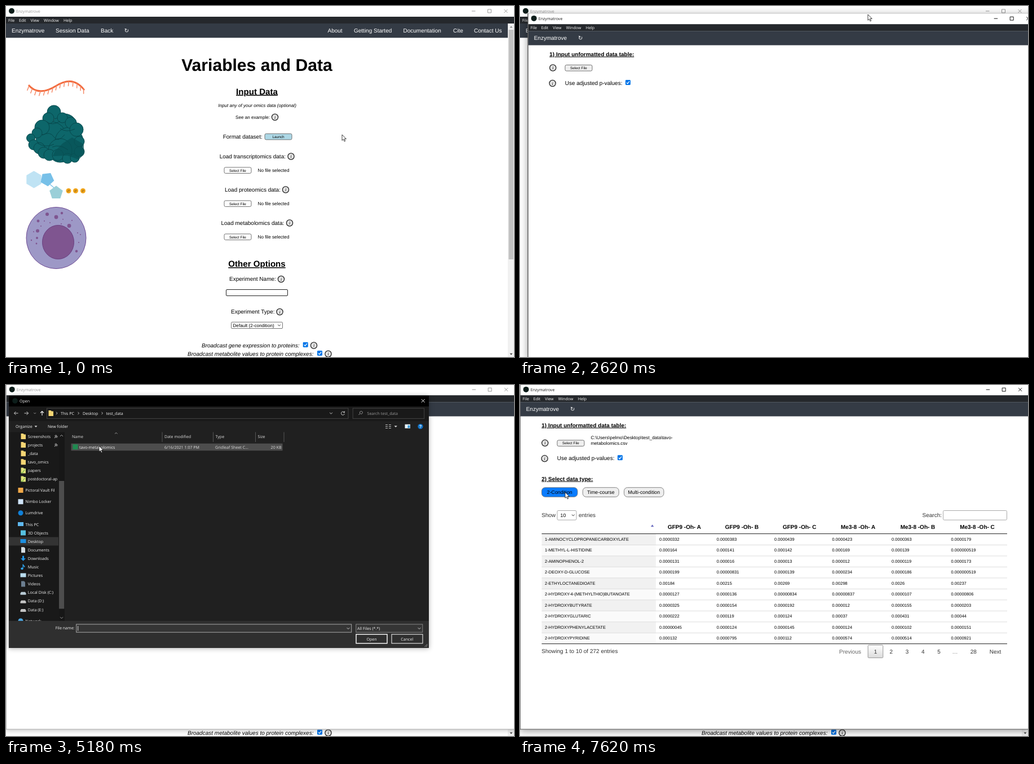
Write an HTML page that moves like this. It is 901 px wide and 622 px high and loops after 8000 ms.

```html
<!DOCTYPE html>
<html lang="en">
<head>
<meta charset="utf-8">
<title>Data formatting walkthrough</title>
<style>
html, body { margin: 0; width: 100%; height: 100%; overflow: hidden; background: #fff; }
svg { display: block; width: 100vw; height: 100vh; font: 10px "Liberation Sans", Arial, sans-serif; text-rendering: geometricPrecision; }
text { white-space: pre; }
.ui { font: 7.1px "Open Sans", "Noto Sans", sans-serif; }
.b { font-weight: bold; }
.u { text-decoration: underline; }
.i { font-style: italic; }
.m { text-anchor: middle; }
.e { text-anchor: end; }
.sym { font-family: "DejaVu Sans", sans-serif; }
.info { font: italic 8px "Liberation Serif", serif; text-anchor: middle; }
.line { fill: none; stroke: currentColor; }
#childShade { filter: drop-shadow(0 3px 7px rgba(0,0,0,.38)); }
#childShade.off { filter: drop-shadow(0 2px 4px rgba(0,0,0,.22)); }
#dialogShade { filter: drop-shadow(0 1px 4px rgba(0,0,0,.3)); }
</style>
</head>
<body>
<svg id="stage" viewBox="0 0 901 622" preserveAspectRatio="none"></svg>
<script>
const APP = 'Enzymatrove', FILE = 'tavo-metabolomics';

const T = (x, y, s, cls = '', o = '') => `<text x="${x}" y="${y}" class="${cls}" ${o}>${s}</text>`;
const S = (n, fill = '') => `style="font-size:${n}px${fill && ';fill:' + fill}"`;
const R = (x, y, w, h, fill, o = '') => `<rect x="${x}" y="${y}" width="${w}" height="${h}" fill="${fill}" ${o}/>`;
const C = (x, y, r, fill, o = '') => `<circle cx="${x}" cy="${y}" r="${r}" fill="${fill}" ${o}/>`;
const P = (d, fill, o = '') => `<path d="${d}" fill="${fill}" ${o}/>`;
const L = (d, color, w = 1) => P(d, 'none', `stroke="${color}" stroke-width="${w}"`);
const G = (id, body, o = '') => `<g id="${id}" ${o}>${body}</g>`;
const chevron = (x, y, s, color = '#ddd') => L(`M${x - s} ${y - s / 2}l${s} ${s} ${s} ${-s}`, color, .9);
const info = (x, y) => C(x, y, 5.6, '#e2e2e2', 'stroke="#222" stroke-width="1.3"') + T(x, y + 2.6, 'i', 'info');
const check = (x, y) => R(x, y, 9, 9, '#0075e8', 'rx="1.4"') + L(`M${x + 2} ${y + 4.7}l1.8 1.9 3.4-4.2`, '#fff', 1.3);
const button = (x, y, s, fill) =>
  R(x, y, 48, 10.6, fill, 'rx="2.4" stroke="#666" stroke-width=".9"') + T(x + 24, y + 7.6, s, 'm', S(6.4));
const poly = (x, y, r, n, turn, fill) =>
  `<polygon fill="${fill}" points="${Array.from({ length: n }, (_, k) => {
    const a = turn + k * 2 * Math.PI / n;
    return (x + r * Math.cos(a)).toFixed(1) + ',' + (y + r * Math.sin(a)).toFixed(1);
  }).join(' ')}"/>`;

// Title bar, menu and navigation shared by both app windows
const head = (id, reloadX) =>
  R(0, 0, 902, 19, '#fff') +
  C(10, 8.7, 5, '#0c1d1a') +
  G(id, T(18, 12, APP, 'ui', 'fill="currentColor"') +
    '<path class="line" d="M826 9h6.5M854.5 6h6v6h-6zM883.5 6l6 6m0-6l-6 6"/>') +
  R(0, 19, 902, 12, '#25282c') +
  [['File', 4], ['Edit', 23], ['View', 43.5], ['Window', 67], ['Help', 102]]
    .map(([s, x]) => T(x, 27.6, s, 'ui', 'fill="#fff"')).join('') +
  R(0, 31, 902, 25.3, '#343b45') +
  T(10, 46.7, APP, '', 'fill="#fff"') +
  T(reloadX, 46.8, '↻', 'sym m', 'fill="#fff"');

function art() {
  const protein = [[104, 213, 22], [80, 232, 27], [112, 240, 25], [96, 256, 21], [85, 188, 12], [75, 199, 10],
    [100, 198, 9], [115, 207, 10], [125, 219, 12], [64, 215, 13], [55, 225, 9], [44, 234, 7.5], [49, 246, 9],
    [59, 252, 10], [67, 260, 10], [77, 264, 10], [92, 264, 10], [109, 270, 9], [122, 269, 8], [130, 258, 9], [130, 240, 9]];
  const spots = [[73, 369, 3], [89, 374, 3.4], [99, 367, 2.2], [57, 381, 2.4], [56, 398.5, 3], [55, 411, 2],
    [112, 389.5, 3.4], [125, 434.5, 2.2], [45, 415, 1.2], [129, 419, 1], [117, 380, 1], [68, 381, 1],
    [62, 390, 1], [78, 384, 1], [98, 386, 1], [49, 400, 1], [127, 402, 1], [132, 405, 1], [101, 378, .9], [54, 421, 1.4]];
  return P('M40 140C53 156 72 152 88 142S122 127 139 149', 'none', 'id="strand" stroke="#f26a3c" stroke-width="2.8"') +
    G('teeth', '') +
    protein.map(([x, y, r]) => C(x, y, r, '#0d666a', 'stroke="#07494d" stroke-width="1"')).join('') +
    P('M101 243l16-10 21 12v18l-9 9-20-7-26 1 4-9z', '#075256', 'opacity=".75"') +
    L('M72 205q10 8 24-1M64 229q14-8 21 3t19-4M56 243q14 9 29 2M82 250q13-6 28 5M96 217q11 8 26 1', '#07494d', 1) +
    L('M62 307h8M78 316l7 6', '#77c0e8', 1.2) +
    poly(49.5, 307.5, 15.2, 6, Math.PI / 6, '#bfe3f4') +
    poly(73, 307, 12.5, 5, .2, '#77c0e8') +
    poly(89, 331, 12.4, 5, -Math.PI / 2, '#9acfd8') +
    [111, 123.5, 136.5].map(x => C(x, 327.5, 4.5, '#f2a61c') + T(x, 329.7, 'P', 'm i', S(6, '#76500a'))).join('') +
    '<ellipse cx="89" cy="411" rx="53" ry="54.5" fill="#9d98c6" stroke="#6f4b94"/>' +
    '<ellipse cx="92.5" cy="418.5" rx="28" ry="30" fill="#7f5590" stroke="#6a3f80"/>' +
    spots.map(([x, y, r]) => C(x, y, r, '#7f5590')).join('');
}

function mainPage() {
  const loader = (y, s, x, ix) =>
    T(x, y + 3.6, s) + info(ix, y + .3) + button(387, y + 19.7, 'Select File', '#fcfcfc') + T(446.5, y + 27.4, 'No file selected', '', S(8.2));
  return R(0, 0, 901, 622, '#fff') + head('mainTitle', 214) +
    [['Session Data', 88], ['Back', 168], ['About', 570.5], ['Getting Started', 617], ['Documentation', 704.5], ['Cite', 793], ['Contact Us', 830]]
      .map(([s, x]) => T(x, 46.7, s, '', 'fill="#fff"')).join('') +
    R(890, 31, 11, 591, '#f1f1f1') + R(891.5, 42, 8.5, 407, '#c1c1c1') +
    P('M893.5 38.5h5l-2.5-3z', '#888') + P('M893.5 615.5h5l-2.5 3z', '#444') +
    art() +
    T(445, 114.5, 'Variables and Data', 'b m', S(30.1)) +
    T(445, 156.5, 'Input Data', 'b u m', S(15.1)) +
    T(445.5, 179, 'Input any of your omics data (optional)', 'i m', S(8.17)) +
    T(407, 200, 'See an example:', '', S(8.15)) + info(477, 197) +
    T(384.7, 235, 'Format dataset:') + button(459, 226.3, 'Launch', '#add8e6') +
    loader(266.2, 'Load transcriptomics data:', 378.7, 505.5) +
    loader(325.2, 'Load proteomics data:', 388, 496) +
    loader(384.2, 'Load metabolomics data:', 381.5, 503) +
    T(445, 462, 'Other Options', 'b u m', S(15.1)) +
    T(396, 487, 'Experiment Name:') + info(488, 484) +
    R(390.5, 502.5, 109, 11, '#fff', 'rx="1.5" stroke="#222"') +
    T(399, 545, 'Experiment Type:') + info(485.5, 542) +
    R(399.5, 560.2, 91, 11.3, '#fff', 'rx="1.5" stroke="#767676"') +
    T(402.5, 568.8, 'Default (2-condition)', '', S(8.15)) + chevron(484.5, 565.8, 2.3, '#111') +
    T(347, 604.5, 'Broadcast gene expression to proteins:', 'i') + check(526.7, 595.7) + info(546, 601.5) +
    T(322, 619.5, 'Broadcast metabolite values to protein complexes:', 'i') + check(552, 610.7) + info(571.5, 616.5);
}

const rows = `1-AMINOCYCLOPROPANECARBOXYLATE 0.0000332 0.0000383 0.0000439 0.0000423 0.0000363 0.0000179
1-METHYL-L-HISTIDINE 0.000164 0.000141 0.000142 0.000169 0.000139 0.000000519
2-AMINOPHENOL-2 0.0000131 0.000016 0.000013 0.000012 0.0000119 0.0000173
2-DEOXY-D-GLUCOSE 0.0000199 0.00000831 0.0000139 0.0000234 0.0000186 0.000000519
2-ETHYLOCTANEDIOATE 0.00184 0.00215 0.00269 0.00298 0.0026 0.00237
2-HYDROXY-4-(METHYLTHIO)BUTANOATE 0.0000127 0.0000136 0.00000834 0.00000837 0.0000107 0.00000806
2-HYDROXYBUTYRATE 0.0000325 0.0000154 0.0000192 0.000012 0.0000155 0.0000203
2-HYDROXYGLUTARIC 0.0000222 0.000119 0.000124 0.00037 0.000431 0.00044
2-HYDROXYPHENYLACETATE 0.00000045 0.0000124 0.0000145 0.0000124 0.0000102 0.0000151
2-HYDROXYPYRIDINE 0.000132 0.0000795 0.000112 0.0000574 0.0000514 0.0000921`.split('\n').map(r => r.split(' '));

function table() {
  const cols = [44, 247, 348.7, 451, 553.5, 659, 764.5];
  const heads = [['GFP9 -Oh- A', 291.5], ['GFP9 -Oh- B', 393.5], ['GFP9 -Oh- C', 495.7], ['Me3-8 -Oh- A', 599.7], ['Me3-8 -Oh- B', 705.5], ['Me3-8 -Oh- C', 811]];
  const pages = [['Previous', 585.5], ['1', 630.5], ['2', 658.3], ['3', 686.5], ['4', 714.7], ['5', 743], ['…', 771.5], ['28', 804.3], ['Next', 843]];
  return T(38.3, 233.7, 'Show', '', 'fill="#333"') + R(66, 222.5, 34, 16.7, '#fff', 'rx="2" stroke="#aaa"') +
    T(71.5, 234, '10', '', S(8.8)) + chevron(94.3, 230.7, 2.4, '#111') + T(104, 233.7, 'entries', '', 'fill="#333"') +
    T(748, 233.7, 'Search:', 'e', 'fill="#333"') + R(750.5, 222.5, 113, 16.7, '#fff', 'rx="2" stroke="#aaa"') +
    P('M232 251.3h5.4l-2.7-4z', '#6a6cc0') +
    heads.map(([s, x]) => T(x, 254.6, s, 'b m')).join('') +
    rows.map((r, k) => {
      const y = 264 + k * 19.48;
      return R(38.5, y, 202.5, 19.5, k % 2 ? '#fafafa' : '#f1f1f1') + (k ? L(`M38.5 ${y}H864`, '#ddd') : '') +
        r.map((s, c) => T(cols[c], y + 11.8, s, '', S(7.55))).join('');
    }).join('') +
    L('M38.5 263.6H864M38.5 458.6H864', '#222') +
    T(38.3, 475, 'Showing 1 to 10 of 272 entries', '', 'fill="#333"') +
    R(617.2, 461, 26.6, 22.4, 'url(#page)', 'rx="1.2" stroke="#979797"') +
    pages.map(([s, x], k) => T(x, 475.5, s, 'm', `fill="${k % 6 ? '#333' : '#666'}"`)).join('');
}

function child() {
  const pill = (x, w, s, id) =>
    R(x, 181.7, w, 16.6, '#efefef', `id="${id}" rx="6" stroke="#777" stroke-width=".9"`) + T(x + w / 2, 193, s, 'm', S(8.8));
  return R(0, -.6, 902, 610.6, '#fff', 'id="childShade" stroke="currentColor"') +
    `<g transform="translate(.7 -.8)">${head('childTitle', 92.5)}</g>` +
    L('M.3-.6V610', 'currentColor', .8) +
    T(38.3, 74.7, '1) Input unformatted data table:', 'b u') +
    G('form', info(44.3, 95.5) + button(66, 90.5, 'Select File', '#efefef') + info(43.7, 123) +
      T(65.7, 125.7, 'Use adjusted p-values:') + check(173, 117)) +
    G('loaded', T(125.5, 96.2, 'C:\\Users\\pelmo\\Desktop\\test_data\\tavo-', '', S(8.2)) + T(125.5, 105.6, 'metabolomics.csv', '', S(8.2)) +
      T(38.3, 169.7, '2) Select data type:', 'b u') +
      pill(38.5, 63.5, '2-Condition', 'twoCond') + pill(111.3, 64, 'Time-course', 'timeCourse') + pill(184.6, 70.4, 'Multi-condition', 'multiCond')) +
    G('table', table());
}

const icons = {
  folder: 'M-4-5h4l1.5 1.5H4.5V5H-4z',
  tile: 'M-4.5-4.5h9v9h-9z',
  disc: 'M-4.5 0a4.5 4.5 0 1 0 9 0a4.5 4.5 0 1 0-9 0',
  screen: 'M-5-4H5V3H-5z',
  page: 'M-3.5-5h5l2 2V5h-7z',
  down: 'M-1.5-4.5h3V0h3L0 4.5-4.5 0h3z',
  note: 'M-1-5h1.2q.3 2 2.8 3.5q0 2-1 2.5q0-2-1.8-2.5V3a2.2 1.8 0 1 1-1.2-1.6z',
  drive: 'M-3.5-1h7l1.5 2.5V4H-5V1.5z'
};
const places = [['Screenshots', 'folder', '#f7d674'], ['projects', 'folder', '#f7d674'], ['_data', 'folder', '#f7d674'],
  ['tavo_omics', 'folder', '#f7d674'], ['papers', 'folder', '#dfe27a'], ['postdoctoral-ap', 'folder', '#dfe27a'],
  ['Pictoral Vault Fil', 'tile', '#f0a848', 1], ['Nimbo Locker', 'tile', '#cfe4f8', 1], ['Lumdrive', 'disc', '#1080d8', 1],
  ['This PC', 'screen', '#5fb8ee', 1], ['3D Objects', 'tile', '#56c0e0'], ['Desktop', 'screen', '#1e90e0'],
  ['Documents', 'page', '#d5dde2'], ['Downloads', 'down', '#2196e8'], ['Music', 'note', '#2fa4ee'], ['Pictures', 'screen', '#b9dcee'],
  ['Videos', 'page', '#6c7e90'], ['Local Disk (C:)', 'drive', '#b8cad4'], ['Data (D:)', 'drive', '#c4c4c4'],
  ['Data (E:)', 'drive', '#c4c4c4'], ['Network', 'disc', '#4ba3dc', 1]];

function dialog() {
  const W = 'fill="#f2f2f2"', ui = (x, y, s, o = W, c = '') => T(x, y, s, 'ui ' + c, o);
  const icon = (x, y, kind, color) => P(icons[kind], color, `transform="translate(${x} ${y})"`);
  let y = 75.9;
  const list = places.map(([s, kind, color, gap]) => {
    y += gap ? 20.1 : 15.1;
    const x = gap ? 26 : 30.5;
    return icon(x, y, kind, color) + (color === '#dfe27a' ? L(`M${x - 4} ${y + 3}l2 2 5-7`, '#4aa53a') : '') + ui(x + 8.3, y + 2.6, s);
  }).join('');
  const pin = y => L(`M86 ${y + 3}l2.5-2.5m-2-2l4 4m-2.5-5l3.5 3.5`, '#999', 1.1);
  const box = (x, y, w, h, fill, stroke, sw = 1) => R(x, y, w, h, fill, `stroke="${stroke}" stroke-width="${sw}"`);
  return R(5, 19, 745, 447, '#202020', 'id="dialogShade"') +
    R(5, 19, 745, 19, '#000') + C(16, 28, 4.8, '#0c1d1a') + ui(24, 31, 'Open') + L('M736.7 25l6 6m0-6l-6 6', '#eee') +
    R(5, 38, 745, 26, '#191919') +
    L('M21.5 50h-7m3-3l-3 3 3 3M32.5 50h7m-3-3l3 3-3 3', '#ccc') + chevron(51.2, 50, 2, '#999') + L('M64 54v-7.5m-3 3l3-3 3 3', '#eee', 1.2) +
    box(72.5, 41.2, 534.5, 18.2, '#191919', '#444') + icon(79.5, 50, 'folder', '#f7d674') +
    [90, 128.5, 170.5].map(x => L(`M${x - 1} 47.8l2 2.2-2 2.2`, '#ccc', .9)).join('') +
    ui(97, 52.7, 'This PC') + ui(136, 52.7, 'Desktop') + ui(177.5, 52.7, 'test_data') +
    chevron(576.5, 50, 2.4) + L('M600 48.5a3 3 0 1 0 .4 2.5M600.5 46.5v2.3h-2.3', '#ccc') +
    box(615.2, 41.2, 126.5, 18.2, '#191919', '#444') + L('M625.5 53l2.5-2.7a2.4 2.4 0 1 1 .5.5', '#aaa', .9) +
    ui(640.5, 52.7, 'Search test_data', 'fill="#999"') +
    R(5, 64, 745, 19.5, '#202020') + ui(17, 76, 'Organize') + P('M50.5 72.2h5l-2.5 2.8z', '#ddd') + ui(74, 76, 'New folder') +
    L('M673 70.5h4m-4 3h4m-4 3h4M679 70.5h4m-4 3h4m-4 3h4', '#bbb', 1.2) + P('M688.5 72.2h5.4l-2.7 2.8z', '#ddd') +
    R(707.5, 69.7, 9.5, 7, '#e8f2f8') + R(712.5, 71.5, 4, 4.5, '#3a9ad8') +
    C(735, 73.5, 4.6, '#1274c8') + T(735, 76.2, '?', 'b m', S(7.5, '#fff')) +
    R(5, 83.5, 99, 335, '#191919') + R(5, 269.5, 88, 15, '#333') +
    `<g clip-path="url(#sideClip)">${list}</g>` + pin(91) + pin(106) +
    R(94, 84, 10, 334, '#171717') + R(94, 170, 9.2, 226.5, '#4d4d4d') +
    L('M96 91l2.5-2.5 2.5 2.5', '#aaa') + chevron(98.5, 412.5, 2.5, '#aaa') +
    L('M277 83.5v17.5M367.5 83.5v17.5M442.5 83.5v17.5M493 83.5v17.5', '#555') + L('M193 86.5l2.3-2 2.3 2', '#aaa', .9) +
    [['Name', 117], ['Date modified', 281], ['Type', 371.5], ['Size', 446.5]].map(([s, x]) => ui(x, 94.4, s, 'fill="#ddd"')).join('') +
    R(115.5, 103.7, 375, 12.6, 'none', 'id="row"') + icon(123, 109.7, 'tile', '#1f8a50') +
    ui(130, 112.5, FILE) + ui(281, 112.5, '6/16/2021 1:07 PM', 'fill="#ddd"') +
    ui(371, 112.5, 'Gridleaf Sheet C...', 'fill="#ddd"') + ui(488.5, 112.5, '20 KB', 'fill="#ddd"', 'e') +
    R(5, 418, 745, 48, '#2f2f2f') + ui(121.5, 433.3, 'File name:', W, 'e') +
    box(124.7, 424, 488, 14.2, '#353535', '#aaa') + chevron(607, 431.3, 2.4) +
    G('caret', L('M127.7 427v8.5', '#fff', .8)) + G('picked', ui(127, 433.8, FILE)) +
    box(620.8, 424, 118, 14.2, '#353535', '#888') + ui(623, 433.6, 'All Files (*.*)') + chevron(733, 431.3, 2.4) +
    box(621, 441.8, 55, 16, '#2f2f2f', '#fff', 1.4) + ui(648.5, 452.5, 'Open', W, 'm') +
    box(684, 441.8, 55, 16, '#2f2f2f', '#ddd', 1.2) + ui(711.3, 452.5, 'Cancel', W, 'm') +
    L('M742.5 464l5-5M745 464l2.5-2.5', '#999');
}

const stage = document.getElementById('stage');
stage.innerHTML = `<defs><clipPath id="sideClip">${R(5, 83.5, 88, 334.5, '#000')}</clipPath>
<linearGradient id="page" x2="0" y2="1"><stop stop-color="#fff"/><stop offset="1" stop-color="#dcdcdc"/></linearGradient></defs>` +
  mainPage() + G('child', child()) + G('dialog', dialog()) +
  P('M0 0V10.3L2.4 8.1 4.1 12 5.8 11.2 4.1 7.5H7.4z', '#fff', 'id="cursor" stroke="#111" stroke-width=".8"');

const $ = id => document.getElementById(id);
const strand = $('strand'), len = strand.getTotalLength();
$('teeth').innerHTML = Array.from({ length: 15 }, (_, k) => {
  const p = strand.getPointAtLength(len * (k + .2) / 14.5);
  return L(`M${p.x} ${p.y}l${-3.4 + k * .25} 8.6`, '#f58a68', 1.5);
}).join('');

// The screen refreshes in bursts: [first, last, count]
const ticks = [[0, 0, 1], [270, 810, 5], [1120, 2080, 8], [2200, 2620, 4], [2770, 3070, 3], [3320, 4130, 7], [4280, 4280, 1],
  [4400, 4550, 2], [4820, 5720, 8], [5870, 6260, 4], [6380, 6800, 4], [6960, 7620, 6]]
  .flatMap(([a, b, n]) => Array.from({ length: n }, (_, k) => a + (b - a) * k / Math.max(1, n - 1)));

const pointer = [[0, 596, 228], [200, 596, 228], [405, 607, 211], [540, 575, 194], [810, 478, 229], [1400, 478, 229],
  [2080, 431, 207], [2620, 617, 15], [2920, 603, 1], [3185, 603, 1], [4006, 98, 96], [4690, 98, 96], [5080, 165, 108],
  [5330, 168, 109], [5720, 624, 427], [6130, 666, 455], [6300, 666, 455], [6800, 452, 289], [7356, 105, 165], [7620, 80, 190]];
const drag = [[0, -183, 208], [2080, -183, 208], [2620, 14, 14], [2920, 0, 0]];

function along(keys, t) {
  const k = keys.findIndex(p => p[0] > t);
  if (k < 0) return keys[keys.length - 1].slice(1);
  const [a, b] = [keys[k - 1], keys[k]], u = (t - a[0]) / (b[0] - a[0]), s = u * u * (3 - 2 * u);
  return [a[1] + (b[1] - a[1]) * s, a[2] + (b[2] - a[2]) * s];
}
const move = (id, [x, y]) => $(id).setAttribute('transform', `translate(${x.toFixed(1)} ${y.toFixed(1)})`);
const show = (id, on) => { $(id).style.display = on ? '' : 'none'; };
const tone = (id, on) => { $(id).style.color = on ? '#1a1a1a' : '#999'; };

let shown = -1;
function draw(t) {
  const within = (a, b = 8000) => t >= a && t < b;
  move('cursor', along(pointer, t));
  move('child', along(drag, t));
  show('child', t >= 1390);
  tone('mainTitle', within(1120, 1390));
  const active = !within(4130, 6380);
  tone('childTitle', active);
  $('child').style.color = active ? '#555' : '#aaa';
  $('childShade').setAttribute('class', active ? '' : 'off');

  show('dialog', within(4280, 6380));
  const grow = t < 4400 ? .98 : t < 4550 ? .997 : 1;
  $('dialog').style.opacity = t < 4400 ? .35 : t < 4550 ? .96 : 1;
  $('dialog').setAttribute('transform', `translate(${377.5 * (1 - grow)} ${242.5 * (1 - grow)}) scale(${grow})`);
  $('row').setAttribute('fill', t >= 5330 ? '#777' : t >= 4940 ? '#4d4d4d' : 'none');
  show('picked', t >= 5330);
  show('caret', t < 5330);

  const loaded = t >= 6380;
  move('form', [0, loaded ? 7.3 : 0]);
  show('loaded', loaded);
  show('table', t >= 6520);
  $('twoCond').setAttribute('fill', t >= 7620 ? '#0a7cff' : '#efefef');
}

function loop() {
  const now = performance.now() % 8000;
  const t = ticks.filter(k => k <= now).pop();
  if (t !== shown) draw(shown = t);
  requestAnimationFrame(loop);
}
loop();
</script>
</body>
</html>
```
